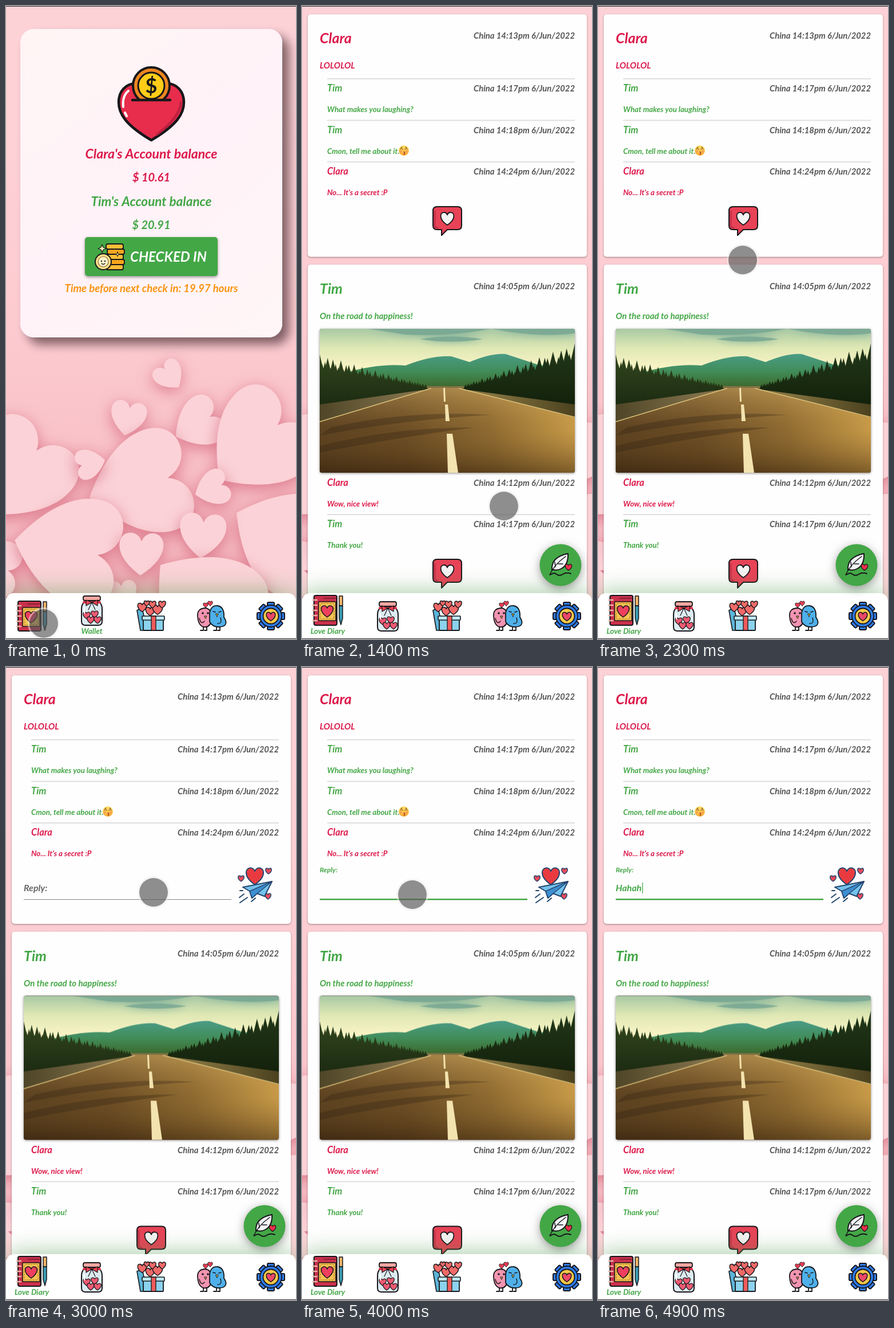
An HTML page with a canvas that plays this animation: 507x1104 px, repeating every 5 s.

```html
<!DOCTYPE html>
<html lang="en">
<head>
<meta charset="utf-8">
<title>Couple diary</title>
<style>
html, body { margin: 0; width: 100%; height: 100%; overflow: hidden; background: #fbcfd4; }
canvas { display: block; width: 507px; height: 1104px; }
</style>
</head>
<body>
<canvas id="stage" width="507" height="1104"></canvas>
<script>
const W = 507, H = 1104, LOOP = 5000, STEP = 100;
const GREEN = '#43a746', ROSE = '#dc1a4b', GREY = '#555', INK = '#17171b', RED = '#e74256';
const HER = 'Clara', HIM = 'Tim';
const stage = document.getElementById('stage').getContext('2d');
let g = stage;

// Tip at the origin, lobes towards +x, length 1
const HEART = new Path2D('M0 0C.2-.3.45-.52.72-.52C1.05-.52 1.1-.1.8 0C1.1.1 1.05.52.72.52C.45.52.2.3 0 0Z');

const clamp = v => Math.max(0, Math.min(1, v));
const mix = (a, b, k) => a + (b - a) * k;

function paint(path, fill, stroke, width = 2) {
  if (fill) { g.fillStyle = fill; g.fill(path); }
  if (stroke) {
    g.strokeStyle = stroke; g.lineWidth = width;
    g.lineCap = g.lineJoin = 'round';
    g.stroke(path);
  }
}
const shape = (d, fill, stroke, width) => paint(new Path2D(d), fill, stroke, width);
function circle(x, y, r, fill, stroke, width) {
  const p = new Path2D();
  p.arc(x, y, r, 0, Math.PI * 2);
  paint(p, fill, stroke, width);
}
function box(x, y, w, h, r, fill, stroke, width) {
  const p = new Path2D();
  p.roundRect(x, y, w, h, r);
  paint(p, fill, stroke, width);
}
function tipHeart(x, y, deg, len, fill, stroke, width = 2) {
  g.save();
  g.translate(x, y);
  g.rotate(deg * Math.PI / 180);
  g.scale(len, len);
  paint(HEART, fill, stroke, width / len);
  g.restore();
}
const heart = (x, y, s, fill, stroke, width) => tipHeart(x, y + s / 2, -90, s, fill, stroke, width);
function at(x, y, draw) {
  g.save();
  g.translate(x, y);
  draw();
  g.restore();
}
function shadow(color, blur, dx, dy, draw) {
  g.save();
  g.shadowColor = color; g.shadowBlur = blur;
  g.shadowOffsetX = dx; g.shadowOffsetY = dy;
  draw();
  g.restore();
}
function text(s, x, y, size, color, align = 'left', font = 'italic 700', family = 'Lato') {
  g.font = `${font} ${size}px ${family}, sans-serif`;
  g.textAlign = align;
  g.fillStyle = color;
  g.fillText(s, x, y);
}
function ramp(x0, y0, x1, y1, ...colors) {
  const r = g.createLinearGradient(x0, y0, x1, y1);
  colors.forEach((c, i) => r.addColorStop(i / (colors.length - 1), c));
  return r;
}
function layer(w, h, draw) {
  const c = document.createElement('canvas');
  c.width = w; c.height = h;
  const keep = g;
  g = c.getContext('2d');
  draw();
  g = keep;
  return c;
}

// Paper hearts: tip x, tip y, angle, length
const PAPER = [
  [302, 665, -128, 50], [208, 749, -80, 60], [297, 751, -30, 86],
  [-30, 886, -53, 173], [373, 826, -43, 174], [-70, 965, 15, 95], [205, 1052, -95, 50],
  [403, 884, 28, 180], [146, 857, -14, 176], [173, 792, 167, 51], [331, 852, -20, 60], [340, 963, -85, 78],
  [15, 932, 10, 184], [235, 993, -88, 74], [270, 975, 40, 190]
];
const backdrop = layer(W, H, () => {
  g.fillStyle = ramp(0, 0, 0, H, '#fdd2d7', '#fdd0d5', '#fccbd0', '#f8bfc6', '#f3b2ba');
  g.fillRect(0, 0, W, H);
  shadow('rgba(200,72,98,.62)', 28, 0, 7, () => {
    for (const p of PAPER) tipHeart(...p, '#fbd2d7');
  });
});

const photo = layer(446, 251, () => {
  g.fillStyle = ramp(0, 0, 0, 100, '#a9c9a4', '#dfe8b4', '#f8f3c6', '#f3eec0');
  g.fillRect(0, 0, 446, 251);
  shadow('#6fa595', 14, 0, 0, () => {
    shape('M85 0H300Q230 14 150 10ZM175 18Q230 9 285 18Q230 27 175 18ZM300 0H446V8Q380 16 300 0Z', 'rgba(118,166,146,.8)');
  });
  shape('M40 78Q100 60 150 64Q196 46 230 48L262 58Q300 42 325 44L380 62L446 75V110H40Z',
    ramp(0, 44, 0, 105, '#4a9c86', '#418c58', '#3c6428'));
  g.fillStyle = ramp(0, 0, 446, 0, '#4f4627', '#80704a', '#857440', '#4b421f');
  g.fillRect(0, 100, 446, 151);

  const road = 'M194 103H244L446 155V251H0V162Z';
  shape(road, ramp(0, 210, 446, 140, '#50391d', '#644722', '#8d6a31', '#d2a34c'));
  shape(road, ramp(0, 103, 0, 251, 'rgba(240,200,120,.4)', 'rgba(150,110,50,.15)', 'rgba(48,28,8,.5)'));
  shape('M20 172Q150 142 300 150Q150 158 0 186ZM0 204Q130 172 270 172Q130 190 0 216Z', 'rgba(45,30,18,.3)');
  shape('M0 162L194 104M244 104L446 154', null, '#dcc07a', 1.5);
  shape('M216 103H219L220 127H217ZM219 132H224L227 161H220ZM222 183H232L242 251H224Z', '#f3e3af');

  // Tree lines grow towards the picture's sides
  const trees = (from, to, rise, color) => {
    shape(`M${from} 102L${to} ${102 - rise * .7}V132L${from} 106Z`, color);
    for (let i = 0; i <= 40; i++) {
      const k = i / 40, x = mix(from, to, k), w = 4 + 5 * k;
      const top = 97 - rise * k * (.85 + .2 * Math.sin(i * 2.4));
      shape(`M${x} ${top}L${x + w} ${top + 30 * k + 8}H${x - w}Z`, color);
    }
  };
  trees(185, 0, 50, ramp(0, 40, 0, 130, '#33481f', '#1d2c12'));
  trees(255, 446, 68, ramp(0, 30, 0, 130, '#22381a', '#14220c'));
});

function book() {
  box(-25, -26, 40, 52, 3, '#c9304b', INK);
  box(-17, -15, 30, 33, 1, '#f6c453', INK, 1.5);
  g.setLineDash([3, 2]);
  box(-14, -12, 24, 27, 1, null, '#a87320', 1);
  g.setLineDash([]);
  heart(-2, 2, 20, '#ed3f5e', INK, 1.5);
  for (let y = -18; y < 22; y += 9) shape(`M-27 ${y}H-20`, null, '#e8b4a8', 2.5);
  shape('M-8 -21H13', null, '#852238', 2);
  shape('M19 -25H25V-8H19Z', '#f2b56c', INK, 1.5);
  shape('M19 -8H25V14L22 25L19 14Z', '#3b9cb5', INK, 1.5);
}
function jar() {
  shape('M-12 -15Q-18 -11 -18 -3V19Q-18 26 -11 26H11Q18 26 18 19V-3Q18 -11 12 -15Z', '#dcebf0', INK, 2);
  box(-15, -25, 30, 8, 3, '#f3a6a0', INK, 1.8);
  shape('M-14 -14H14', null, '#df3147', 4);
  shape('M0 -14L-10 -18V-8ZM0 -14L10 -18V-8ZM0 -14L-6 -1M0 -14L6 -1', '#ee4354', INK, 1.2);
  for (const [x, y] of [[-9, 9], [5, 7], [-2, 17], [10, 17]]) heart(x, y, 12, '#ee5a72', INK, 1.2);
  shape('M-13 -5V5', null, '#fff', 2);
}
function gift() {
  shape('M-26 -10L-17 -14L-8 25H-20Z', '#5bb5d8', INK, 1.6);
  for (const [x, y, s] of [[-17, -15, 15], [-3, -8, 15], [10, -11, 17], [1, -20, 12], [18, -20, 12], [-9, -22, 9]])
    heart(x, y, s, '#ef6a68', INK, 1.4);
  box(-15, 4, 35, 21, 1, '#8bd2ec', INK, 1.8);
  box(-17, 0, 39, 7, 1, '#bce8f5', INK, 1.6);
  box(-1, 0, 8, 25, 0, '#ef5b5b', INK, 1.3);
}
function birds() {
  heart(-9, -19, 8, '#ef3e55', INK, 1);
  heart(-1, -22, 8, '#ef3e55', INK, 1);
  shape('M-13 18V25H-18M-7 18V25H-11M10 18V25H5M16 18V25H12', null, INK, 1.8);
  shape('M-23 0Q-24 -13 -10 -14Q3 -13 1 8Q-1 20 -12 19Q-22 17 -23 0Z', '#f394b1', INK, 1.8);
  shape('M-2 -5Q0 -19 12 -18Q24 -16 23 2Q31 14 21 18Q5 22 -2 10Z', '#4fb0ea', INK, 1.8);
  circle(-14, -5, 1.8, INK); circle(-5, -5, 1.8, INK);
  shape('M4 -8L8 -7M14 -7L18 -8', null, INK, 1.6);
  shape('M-11 0H-7L-9 4ZM9 -4H13L11 1Z', '#f4c63f', INK, 1);
  shape('M-20 4Q-17 16 -11 9M17 3Q20 14 12 13', null, INK, 1.4);
}
function gear() {
  g.save();
  for (let i = 0; i < 8; i++) {
    box(-6, -24, 12, 12, 2, '#2f7bea', INK, 2);
    g.rotate(Math.PI / 4);
  }
  g.restore();
  circle(0, 0, 19, '#2f7bea', INK, 1.8);
  circle(0, 0, 13.5, '#f7c84a', INK, 1.8);
  heart(0, 1, 15, '#ee476a', INK, 1.5);
}
function coins() {
  for (let i = 0; i < 5; i++) box(i % 2 ? -4 : -6, 14 - i * 9, 30, 9, 3, i % 2 ? '#f6a51d' : '#ffbd35', INK, 1.8);
  circle(-11, 9, 14, '#ffe08a', INK, 2);
  circle(-11, 9, 9, '#fff3c9', '#8a6a35', 1.2);
  circle(-14, 8, 1.2, INK); circle(-8, 8, 1.2, INK);
  shape('M-14 12Q-11 15 -8 12', null, INK, 1.2);
  shape('M-13 -21L-11 -16L-6 -14L-11 -12L-13 -7L-15 -12L-20 -14L-15 -16Z', '#fff2b8', INK, 1.2);
  shape('M14 -8L15 -5L18 -4L15 -3L14 0L13 -3L10 -4L13 -5Z', '#fff2b8', INK, 1);
}
function bubble() {
  shape('M-18 -25H18Q25 -25 25 -18V8Q25 15 18 15H0L-10 25V15H-18Q-25 15 -25 8V-18Q-25 -25 -18 -25Z', RED, INK, 2);
  shape('M-22 -17V7Q-22 12 -17 12', null, '#bd2f48', 3);
  heart(0, -4, 22, '#f6f3f3', INK, 1.8);
}
function plane() {
  heart(-1, -15, 29, '#e93b3f', '#24466f', 2);
  for (const [x, y] of [[23, -24], [-25, -11], [22, 20]]) heart(x, y, 10, '#ee4a58', '#24466f', 1.5);
  shape('M29 -6L-22 4L-10 11L-6 23L3 15L16 20Z', '#73c2ec', '#24466f', 2);
  shape('M29 -6L-10 11L-6 23L3 15Z', '#3d8fd1', '#24466f', 1.6);
  shape('M-20 16L-28 22M-14 22L-27 31M-22 10H-27M0 23L-7 29', null, '#24466f', 2);
}
function quill() {
  shape('M-15 10Q-17 -13 13 -19Q14 0 2 7Q-5 11 -13 9Z', '#f3f3f5', INK, 2);
  shape('M-19 18Q-11 0 9 -14M-9 4L-10 -4M-4 -1L4 -1', null, INK, 1.5);
  shape('M-18 18Q-12 13 -7 17T4 17T18 16', null, INK, 2);
  heart(14, 5, 11, '#ec2f4b', INK, 1.2);
}
function kiss() {
  circle(0, 0, 9, ramp(0, -9, 0, 9, '#ffe067', '#f7ac34'));
  circle(-5.5, 2, 2.2, '#f8a052'); circle(5.5, 2, 2.2, '#f8a052');
  shape('M-6 -2Q-4 -5 -2 -2M2 -2Q4 -5 6 -2M-5 -5L-3 -6M3 -6L5 -5', null, '#70421b', 1.1);
  shape('M0 2Q4 3 0 4.5Q4 6 0 7', null, '#a12f27', 1.1);
}

function savings() {
  const body = 'M254 234C208 207 197 187 197 168C197 148 210 135 228 135C241 135 250 142 254 152' +
    'C258 142 267 135 280 135C298 135 311 148 311 168C311 187 300 207 254 234Z';
  shape(body, '#e72d4b', INK, 4.5);
  shape('M306 168Q304 194 264 224', null, '#bd1f40', 4);
  shape('M205 176Q203 157 214 148M208 186L211 192', null, '#fff', 4);
  g.save();
  g.beginPath(); g.rect(210, 95, 90, 69); g.clip();
  circle(254, 139, 32, '#ee8620', INK, 4);
  circle(254, 139, 23, '#ffcd18', INK, 3);
  text('$', 254, 152, 36, INK, 'center', '700');
  g.restore();
  shape('M221 164H287', null, INK, 4.5);
}
function walletPage() {
  shadow('rgba(60,35,40,.65)', 18, 12, 12, () => box(25, 40, 458, 538, 24, '#fff5f7'));
  box(25, 40, 458, 538, 24, ramp(25, 40, 483, 578, '#fff5f5', '#fff2f8', '#fff6f7'));
  savings();
  text(`${HER}'s Account balance`, 254, 266, 23, ROSE, 'center');
  text('$ 10.61', 254, 306, 20, ROSE, 'center');
  text(`${HIM}'s Account balance`, 254, 349, 22.5, GREEN, 'center');
  text('$ 20.91', 254, 389, 20, GREEN, 'center');
  shadow('rgba(0,0,0,.4)', 5, 0, 2, () => box(138, 403, 232, 68, 5, GREEN));
  at(181, 437, coins);
  text('CHECKED IN', 284, 446, 24, '#fff', 'center');
  text('Time before next check in: 19.97 hours', 254, 499, 18.5, '#f9930f', 'center');
}

const card = (y, h) => shadow('rgba(0,0,0,.4)', 3, 0, 1, () => box(10, y, 488, h, 5, '#fffefe'));
const stamp = (time, y) => text(`China ${time}pm 6/Jun/2022`, 477, y, 14.8, GREY, 'right');
function post(name, time, line, y) {
  const color = name === HER ? ROSE : GREEN;
  text(name, 31, y + 50, 25, color);
  stamp(time, y + 42);
  text(line, 31, y + 94, 15, color);
}
function comment(name, time, line, y, ruled = true) {
  const color = name === HER ? ROSE : GREEN;
  if (ruled) { g.fillStyle = '#dfdfe2'; g.fillRect(44, y - 1, 433, 2); }
  text(name, 44, y + 22, 16.5, color);
  stamp(time, y + 22);
  text(line, 44, y + 58, 13.3, color);
}
function replyForm(t) {
  const k = clamp((t - 3500) / 200);
  at(436, 380, plane);
  text('Reply:', 31, mix(391, 358, k), mix(16, 12, k), k > .4 ? GREEN : '#666');
  g.fillStyle = '#858585';
  g.fillRect(31, 405, 363, 1);
  g.fillStyle = GREEN;
  g.fillRect(212.5 - 181.5 * k, 404, 363 * k, 2.5);
  if (t < 3500) return;
  const typed = t < 4300 ? '' : 'Hahah'.slice(0, Math.floor((t - 4300) / 130) + 1);
  text(typed, 31, 391, 16, GREEN);
  if (typed || t < 4000) {
    g.fillStyle = GREEN;
    g.fillRect(32 + g.measureText(typed).width, 376, 1.3, 19);
  }
}
function diaryPage(t) {
  const open = t >= 2700, shift = open ? 10.5 : 0;
  card(14.5, 423 + shift);
  post(HER, '14:13', 'LOLOLOL', 15);
  comment(HIM, '14:17', 'What makes you laughing?', 127);
  comment(HIM, '14:18', 'Cmon, tell me about it.', 199.5);
  at(178, 252, kiss);
  comment(HER, '14:24', "No... It's a secret :P", 272);
  if (open) replyForm(t); else at(254, 375, bubble);

  g.save();
  g.translate(0, shift);
  card(451, 640);
  post(HIM, '14:05', 'On the road to happiness!', 452);
  shadow('rgba(0,0,0,.45)', 4, 0, 1, () => box(31, 563, 446, 251, 4, '#4a3a22'));
  g.save();
  g.beginPath(); g.roundRect(31, 563, 446, 251, 4); g.clip();
  g.drawImage(photo, 31, 563);
  g.restore();
  comment(HER, '14:12', 'Wow, nice view!', 815, false);
  comment(HIM, '14:17', 'Thank you!', 887);
  at(254, 990, bubble);
  g.restore();
}
function fab() {
  shadow('rgba(0,0,0,.38)', 16, 0, 4, () => circle(452, 975, 36.5, GREEN));
  at(452, 974, quill);
}
function banner(t) {
  const k = Math.min(clamp((t - 100) / 200), clamp((1100 - t) / 200));
  if (!k) return;
  g.save();
  g.globalAlpha = k;
  shadow('rgba(0,0,0,.4)', 8, 0, 3, () => box(10, 12, 488, 69, 5, GREEN));
  shape('M36 49A12.5 12.5 0 0 1 51 32.5M58 40A12.5 12.5 0 0 1 43 56M41 44L46 49L58 36', null, '#fff', 2.6);
  shape('M49 28L56 34L48 37ZM45 52L38 54L45 60Z', '#fff');
  text('Loading the latest diaries...', 77, 53, 17, '#fff');
  g.restore();
}
function navBar(active) {
  shadow('rgba(67,150,71,.5)', 42, 0, -2, () => box(0, 1024, W, 92, 14, '#fff'));
  [book, jar, gift, birds, gear].forEach((icon, i) =>
    at([46, 150, 255, 358, 463][i], i === active ? 1054 : 1064, icon));
  if (active) text('Wallet', 150, 1095, 13.5, GREEN, 'center');
  else text('Love Diary', 45, 1095, 13.5, GREEN, 'center');
}
function statusBar() {
  box(341, 1075, 180, 40, [4, 0, 0, 0], '#2d313a');
  text('Waiting for api.airt...', 348, 1095, 16, '#d9dbe0', 'left', '400', 'Roboto');
}

// Touch track: time, x, y, opacity
const TRACK = [
  [0, 66, 1077, .66], [300, 66, 1077, .66], [600, 62, 1074, .5], [900, 62, 1074, .5],
  [1400, 353, 872, .68], [1800, 300, 650, .68], [2300, 253, 443, .68], [2600, 254, 380, .68],
  [3000, 258, 393, .68], [3200, 245, 394, .68], [3500, 193, 397, .68], [4200, 193, 397, .68]
];
function touch(t) {
  const i = TRACK.findIndex(p => p[0] > t);
  if (i < 0) return;
  const a = TRACK[i - 1], b = TRACK[i], k = (t - a[0]) / (b[0] - a[0]);
  const [x, y, alpha] = [1, 2, 3].map(n => mix(a[n], b[n], k));
  circle(x, y, 26.5, null, 'rgba(235,235,235,.5)', 3);
  circle(x, y, 25, `rgba(90,90,90,${alpha})`);
}

function draw(t) {
  g.drawImage(backdrop, 0, 0);
  const wallet = t < 200;
  if (wallet) walletPage();
  else { diaryPage(t); banner(t); }
  navBar(wallet ? 1 : 0);
  if (!wallet) fab();
  touch(t);
  if (t >= 400 && t < 1000) statusBar();
  g.fillStyle = '#302628';
  g.fillRect(0, 0, W, 1);
  g.fillRect(0, H - 1, W, 1);
}

let last = -1;
function tick() {
  const t = Math.floor(performance.now() % LOOP / STEP) * STEP;
  if (t !== last) draw(last = t);
  requestAnimationFrame(tick);
}
draw(0);
tick();
</script>
</body>
</html>
```
